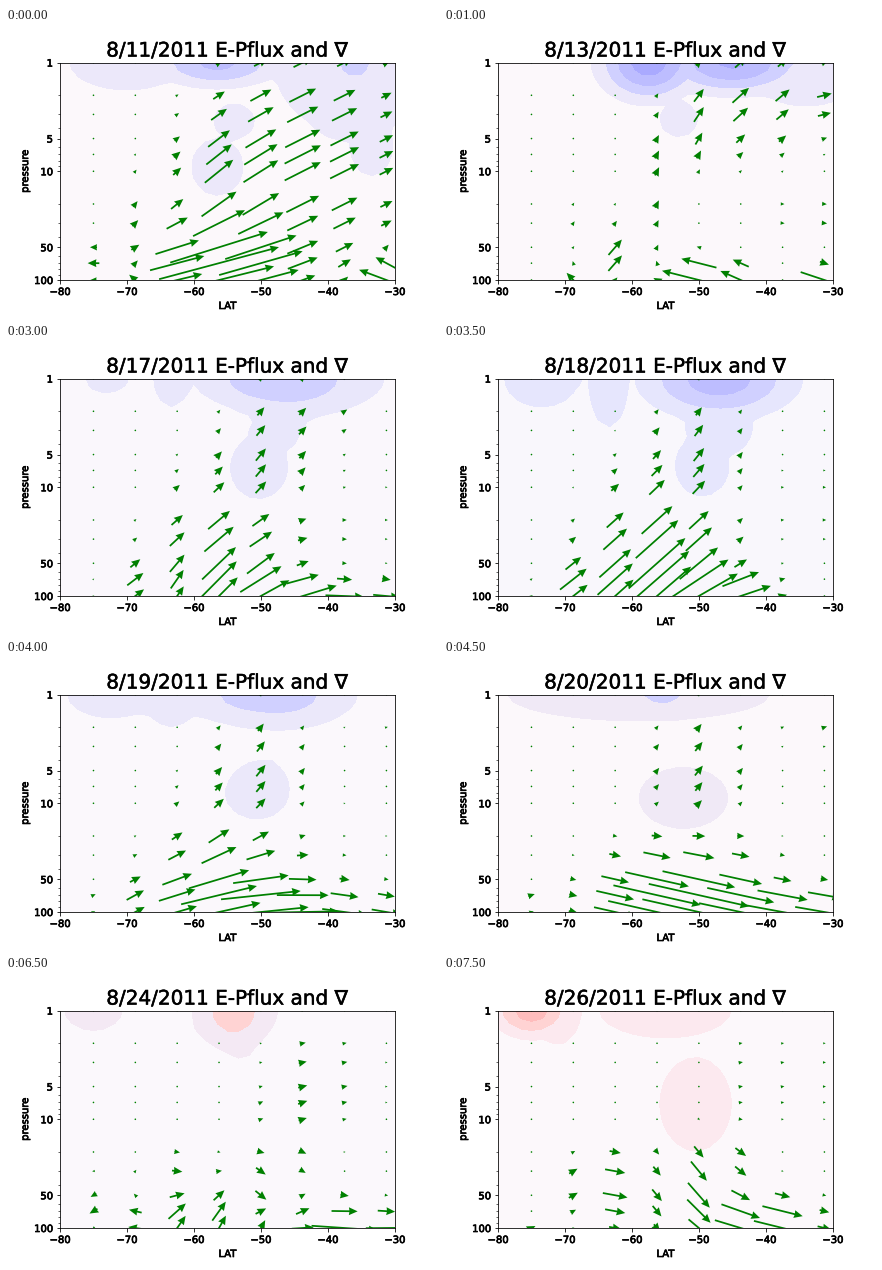
A matplotlib script for the animation above (8 s loop, 432 px wide and 288 px high).

```python
import numpy as np
import matplotlib.pyplot as plt
from matplotlib.animation import FuncAnimation
from matplotlib.colors import to_rgb
from matplotlib.patheffects import withStroke
from matplotlib.ticker import NullFormatter

plt.rcParams.update({"font.family": "DejaVu Sans", "font.size": 10})

ROSE, COOL = "#fcf8fb", "#f9f7fc"
LILAC, SKY, MAUVE, PINK = "#ece8fa", "#e6e6fd", "#f0e9f6", "#fce9ef"
BANDS = [-9, -3, -2, -1, 1, 2, 3, 4, 9]
WARM, COLD = ["#ffbcbc", "#ffd3d3"], ["#d0d0ff", "#bdbdff", "#aaaaff"]

# Depth runs from 0 (1 hPa) to 1 (100 hPa), linear in log pressure.
levels = np.array([1, 2, 3, 5, 7, 10, 20, 30, 50, 70, 100])
lat, depth = np.meshgrid(np.arange(-75, -30, 6.25), np.log10(levels) / 2)
cloud_lat, cloud_depth = np.meshgrid(np.linspace(-80, -30, 31),
                                     np.linspace(0, 1, 31))
days = {}


def distance2(x, z, x0, z0, width, height):
    return ((x - x0) / width) ** 2 + ((z - z0) / height) ** 2


def cloud_field(clouds):
    """Strongest of several bumps; each has the value +-1 on its ellipse."""
    bumps = np.array([
        np.sign(peak) * abs(peak) ** (1 - distance2(cloud_lat, cloud_depth, *box))
        for *box, peak in clouds])
    strongest = np.abs(bumps).argmax(axis=0)
    return np.take_along_axis(bumps, strongest[None], axis=0)[0]


def wind_field(gusts):
    """Sum of bell-shaped gusts; vectors are in pixels, v pointing up."""
    return sum(v * np.exp(-distance2(lat, depth, *box)) for *box, v in gusts)


def add_day(index, back, tint, clouds, gusts):
    days[index] = (np.array(to_rgb(back)), np.array(to_rgb(tint)),
                   cloud_field(clouds), wind_field(gusts))


# Each cloud or gust: latitude, depth, width, height, strength.
add_day(0, ROSE, LILAC, [
    (-70, 0, 8.5, 0.125, 1.7),
    (-56.5, 0, 10, 0.12, 3.3),
    (-36, 0, 12, 0.33, 2.05),
    (-37, 0.22, 6, 0.14, 1.6),
    (-33.5, 0.38, 3.2, 0.14, 1.6),
    (-56.5, 0.48, 3.8, 0.13, 1.6),
    (-54, 0.27, 3, 0.08, 1.6),
], [
    (-43, 0.45, 12, 0.55, 36+18j),
    (-55, 0.6, 6, 0.35, 20+20j),
    (-55.5, 0.95, 8, 0.18, 110+22j),
    (-66, 0.7, 4, 0.25, 6+9j),
    (-75, 0.92, 3, 0.1, -12),
    (-69, 1, 2.5, 0.06, -20+8j),
    (-31, 1, 4, 0.09, -60+18j),
])

add_day(2, ROSE, LILAC, [
    (-57.5, 0, 8.5, 0.2, 4.6),
    (-45, 0, 12, 0.16, 4.2),
    (-34, 0, 9, 0.2, 1.9),
    (-53, 0.26, 2.8, 0.08, 1.6),
], [
    (-42, 0.15, 9, 0.25, 17+15j),
    (-31, 0.18, 4, 0.15, 11),
    (-50, 0.28, 4, 0.2, 3+9j),
    (-56, 0.55, 3.5, 0.35, 4+8j),
    (-62.5, 0.89, 4, 0.1, 15+17j),
    (-66, 0.72, 4, 0.12, 4+6j),
    (-34, 0.7, 4, 0.08, 11-1j),
    (-69, 1, 2.5, 0.06, -14+14j),
    (-51, 1, 3.5, 0.09, -80+20j),
    (-44, 1, 2.5, 0.08, -40+18j),
    (-31, 1, 2.5, 0.06, 48-16j),
])

add_day(4, ROSE, MAUVE, [
    (-53, 0, 10, 0.08, 1.6),
    (-35, 0, 14, 0.17, 2.05),
    (-52.5, 0.43, 5.2, 0.18, 1.6),
], [
    (-45, 0.2, 7, 0.32, 15+14j),
    (-36.5, 0.15, 5, 0.12, 11+6j),
    (-50, 0.45, 4, 0.15, 3+6j),
    (-46, 0.73, 10, 0.13, 17-3j),
    (-38, 0.96, 9, 0.09, 22-7j),
    (-35, 1, 8, 0.06, 85-5j),
    (-45, 1, 4, 0.05, 50+30j),
    (-60, 0.97, 5, 0.16, -45-10j),
    (-69, 0.96, 2, 0.07, -4-6j),
])

add_day(7, COOL, SKY, [
    (-73.5, 0, 5.5, 0.13, 1.6),
    (-63.5, 0, 3, 0.22, 1.6),
    (-47, 0, 12.5, 0.2, 3.6),
    (-47, 0.22, 5, 0.14, 1.6),
    (-49.5, 0.4, 4, 0.14, 1.6),
], [
    (-56, 1, 8.5, 0.4, 65+58j),
    (-46, 1, 6, 0.1, 60+15j),
    (-69.5, 0.97, 3.5, 0.13, 24+18j),
    (-50, 0.3, 7, 0.25, 8+11j),
    (-34, 0.6, 5, 0.25, 5),
])

add_day(9, ROSE, MAUVE, [
    (-59, 0, 19.5, 0.12, 1.9),
    (-55.5, 0, 9, 0.12, 2.15),
    (-52.3, 0.475, 6.6, 0.14, 1.6),
], [
    (-52, 1, 10.5, 0.23, 115-26j),
    (-35, 1, 8, 0.1, 70-12j),
    (-50, 0.32, 8, 0.27, 8+10j),
    (-33, 0.15, 5, 0.1, 6+2j),
    (-75, 0.95, 2.5, 0.06, 7+3j),
])

add_day(11, COOL, LILAC, [
    (-64, 0, 2, 0.06, 1.6),
    (-54, 0, 6, 0.23, -3.7),
    (-54, 0.93, 6, 0.22, 1.6),
], [
    (-43, 0.33, 8, 0.28, 13+3j),
    (-47, 0.47, 4.5, 0.1, 6+7j),
    (-57, 1, 3.5, 0.2, 22+58j),
    (-62.5, 1, 3, 0.12, 20+46j),
    (-50, 0.98, 3, 0.09, -4+50j),
    (-51, 0.68, 3.5, 0.1, 4+8j),
    (-43.75, 0.93, 2.5, 0.12, -12+25j),
    (-37.5, 0.92, 2.5, 0.05, 8+9j),
    (-34.5, 1, 4, 0.045, 130+8j),
    (-31, 0.92, 2, 0.05, 22),
    (-75, 0.93, 3, 0.13, -16-10j),
    (-69, 0.96, 3, 0.12, -34+3j),
    (-72, 0.7, 4, 0.1, -7+1j),
])

add_day(15, ROSE, PINK, [
    (-75, 0, 6.5, 0.14, -3.7),
    (-71, 0, 3.5, 0.16, -1.6),
    (-55, 0, 10, 0.13, -1.6),
    (-50.5, 0.43, 5.5, 0.22, -1.6),
], [
    (-51, 0.85, 6, 0.22, 20-25j),
    (-40, 1, 7, 0.13, 65-16j),
    (-44, 0.68, 4, 0.12, 8-6j),
    (-63, 0.83, 3.2, 0.2, 25-4j),
    (-69, 0.8, 2.5, 0.15, 9+6j),
    (-75, 1, 2, 0.05, 8+4j),
    (-41, 0.3, 5, 0.3, 6+1j),
    (-31, 0.3, 3, 0.3, 3),
])


def embolden(text, width):
    text.set_path_effects([withStroke(linewidth=width, foreground="black")])


fig = plt.figure(figsize=(6, 4), dpi=72, facecolor="white")
ax = fig.add_axes([0.125, 0.125, 0.775, 0.755])
ax.set_yscale("log")
ax.set_xlim(-80, -30)
ax.set_ylim(100, 1)
ax.set_yticks([1, 5, 10, 50, 100], ["1", "5", "10", "50", "100"])
ax.yaxis.set_minor_formatter(NullFormatter())
title = ax.set_title("", fontsize=20)
embolden(title, 0.5)
for label in [ax.set_xlabel("LAT"), ax.set_ylabel("pressure"),
              *ax.get_xticklabels(), *ax.get_yticklabels()]:
    embolden(label, 0.7)

arrows = ax.quiver(lat, 100 ** depth, np.ones(lat.shape), np.ones(lat.shape),
                   color="green", pivot="mid", units="dots", width=1.75,
                   headwidth=4.5, headlength=5, headaxislength=4.7,
                   scale_units="dots", scale=1, zorder=2)
drawn = []


def update(i):
    before = max(k for k in days if k <= i)
    after = min(k for k in days if k >= i)
    w = (i - before) / max(after - before, 1)
    back, tint, clouds, wind = (a * (1 - w) + b * w
                                for a, b in zip(days[before], days[after]))
    while drawn:
        drawn.pop().remove()
    drawn.append(ax.contourf(cloud_lat, 100 ** cloud_depth, clouds, BANDS,
                             colors=[*WARM, tint, back, tint, *COLD], zorder=1))
    arrows.set_UVC(wind.real, wind.imag)
    title.set_text(f"8/{11 + i}/2011 E-Pflux and \u2207")
    return [*drawn, arrows, title]


anim = FuncAnimation(fig, update, frames=16, interval=500, repeat=True,
                     repeat_delay=0, blit=False)
plt.show()
```
